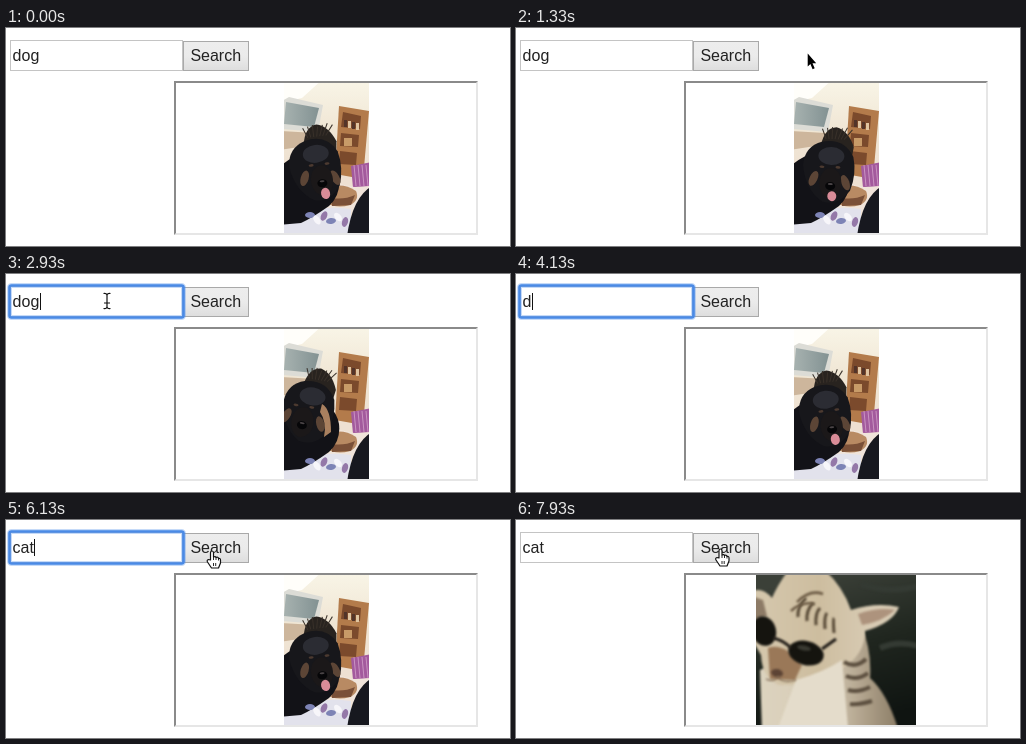
Write an HTML page with a canvas that moves like this. It is 504 px wide and 218 px high and loops after 8000 ms.

```html
<!DOCTYPE html>
<html lang="en">
<head>
<meta charset="utf-8">
<title>Image search</title>
<style>
  html, body { margin: 0; width: 100%; height: 100%; overflow: hidden; background: #fff; }
  canvas { display: block; }
</style>
</head>
<body>
<canvas width="504" height="218"></canvas>
<script>
const LOOP = 8000, FOCUS = 2860, CLICK = 6500, RELEASE = 6600, BLANK = 6730, CAT = 7000, CAT_CUT = 7600;
const DOG_PERIOD = 2045;
const ctx = document.querySelector('canvas').getContext('2d');

// Contents of the search field from each time on.
const typing = [[0, 'dog'], [3600, 'do'], [3930, 'd'], [4300, ''], [4600, 'c'], [4870, 'ca'], [5130, 'cat']];

// Pointer hot spot: time, x, y.
const pointer = [[900, 512, 10], [1250, 298, 25], [1330, 291, 25], [1800, 291, 25],
  [2600, 118, 27], [2800, 101, 27], [5500, 101, 27], [6000, 206, 32], [6300, 206, 32], [6500, 204.5, 30]];

// Dog head: phase, x, y, tilt, muzzle shift, tongue length.
const dogHead = [[0, 309, 136, -.12, 3, 9], [450, 306, 134, 0, -3, 6], [880, 303, 132, .16, -6, 0],
  [1330, 313, 138, .04, 0, 8], [1700, 311, 137, -.06, 2, 9], [DOG_PERIOD, 309, 136, -.12, 3, 9]];

function sample(keys, t) {
  const i = keys.findIndex(k => k[0] > t);
  if (i === 0) return keys[0].slice(1);
  if (i < 0) return keys.at(-1).slice(1);
  const a = keys[i - 1], b = keys[i];
  const u = (t - a[0]) / (b[0] - a[0]), e = u * u * (3 - 2 * u);
  return a.slice(1).map((v, n) => v + (b[n + 1] - v) * e);
}

function rect(color, x, y, w, h) {
  ctx.fillStyle = color;
  ctx.fillRect(x, y, w, h);
}
function shape(color, d) {
  ctx.fillStyle = color;
  ctx.fill(new Path2D(d));
}
function line(color, width, d) {
  ctx.strokeStyle = color;
  ctx.lineWidth = width;
  ctx.stroke(new Path2D(d));
}
function oval(color, x, y, rx, ry, angle = 0) {
  ctx.fillStyle = color;
  ctx.beginPath();
  ctx.ellipse(x, y, rx, ry, angle, 0, Math.PI * 2);
  ctx.fill();
}
function gradient(x0, y0, x1, y1, ...colors) {
  const g = ctx.createLinearGradient(x0, y0, x1, y1);
  colors.forEach((c, i) => g.addColorStop(i / (colors.length - 1), c));
  return g;
}
function photo(x, w, blur, draw) {
  ctx.save();
  ctx.beginPath();
  ctx.rect(x, 55, w, 150);
  ctx.clip();
  ctx.filter = `blur(${blur}px)`;
  draw();
  ctx.restore();
}

function drawRoom() {
  rect(gradient(0, 55, 0, 150, '#f8f4e6', '#f0e6d4', '#eee0d2'), 270, 50, 100, 160);
  shape('#fffefa', 'M274 50H318L296 70L274 75Z');
  // Television on its stand
  shape('#cdb69c', 'M274 103L326 106V114L274 122Z');
  shape('#dcdcd6', 'M276 73L283 69L317 77L312 104L276 101Z');
  shape(gradient(280, 0, 316, 0, '#a5b0ae', '#7f8f90'), 'M280 74L313 80L308 99L278 96Z');
  // Shelf
  shape('#b37b4b', 'M333 78L363 83L357 151L329 146Z');
  shape('#7b4a2c', 'M337 84L355 88L354 101L335 99ZM335 105L353 107L352 119L334 118ZM334 123L351 125L350 137L333 136Z');
  for (let i = 0; i < 4; i++) rect(i % 2 ? '#e0c4a0' : '#523429', 338 + i * 4, 92 + i, 3, 7);
  rect('#c89b68', 338, 110, 8, 8);
  // Basket
  shape('#a35a9d', 'M345 138L366 134V158L347 160Z');
  for (let i = 0; i < 4; i++) line('#d3a3cb', .8, `M${348 + i * 4} 137L${350 + i * 4} 158`);
  shape('#f0e4da', 'M318 152L348 159L366 158V185H318Z');
}

function drawDog(t) {
  const [x, y, tilt, muzzle, tongue] = sample(dogHead, t % DOG_PERIOD);
  drawRoom();
  shape('#e2e2ec', 'M274 192Q305 176 345 181V210H274Z');
  shape('#b88a63', 'M322 160Q336 154 350 163Q354 172 344 177Q331 181 320 175Z');
  shape('#7a5038', 'M326 170Q338 172 349 167L345 177L326 178Z');
  shape('#121217', 'M272 140Q288 126 302 124Q329 128 333 150Q335 167 323 178Q306 190 295 195L272 197Z');
  ctx.save();
  ctx.translate(x, y);
  ctx.rotate(tilt);
  shape('#28231f', 'M-9-20Q-6-38 6-39Q18-36 24-20L22-6L0-10Z');
  shape('#17171b', 'M-26 0Q-25-19-8-24Q14-29 24-10Q28 7 22 24Q11 40-5 36Q-23 25-26 0Z');
  oval('#2b2c33', 2, -10, 13, 9);
  for (let i = 0; i < 7; i++) line('#39312a', 1, `M${i * 3 - 4}-27L${i * 5 - 8}-${37 + i % 3}`);
  oval('#5c4536', -15 + muzzle, 13, 4, 8, .4);
  oval('#5c4536', 17 + muzzle / 2, 16, 4, 8, -.4);
  oval('#1b1819', 2 + muzzle, 17, 11, 15);
  oval('#4c3a30', -7 + muzzle, 1, 2.5, 1.3);
  oval('#4c3a30', 9 + muzzle, 1, 2.5, 1.3);
  oval('#060608', 2 + muzzle, 20, 5, 4);
  oval('#4a4446', 2 + muzzle, 18, 2.5, 1);
  if (tongue > 1) oval('#d98c98', 4 + muzzle, 26 + tongue / 2, 4.5, tongue / 1.6, -.1);
  ctx.restore();
  // Front leg seen while the head is turned away
  ctx.globalAlpha = Math.max(0, -muzzle / 6);
  shape('#a9805f', 'M316 130Q325 135 325 158L318 163Q321 148 314 138Z');
  ctx.globalAlpha = 1;
  for (let i = 0; i < 6; i++) {
    oval(['#7d83b5', '#f7f6fa', '#9478a8'][i % 3], 304 + i * 7, 187 + (i * 5) % 9, 5, 3, i);
  }
  shape('#17181f', 'M368 157Q347 167 341 208H368Z');
}

function drawCatBiting(t) {
  const sway = Math.sin((t - 7270) / 130) * 2;
  rect(gradient(240, 55, 400, 205, '#3b413a', '#262d28', '#161c18', '#20261f'), 235, 50, 170, 160);
  shape('#474c43', 'M235 62Q262 58 285 66Q262 76 235 94Z');
  line('#3a403a', 5, 'M366 128Q384 140 402 132M374 158Q388 170 402 164');
  ctx.save();
  ctx.translate(sway, 0);
  // Body, then head with both ears
  shape(gradient(285, 0, 378, 0, '#d9d2c3', '#cfc3b0', '#8f8470'),
    'M284 140L350 112Q356 142 366 162Q376 182 379 210H272Z');
  shape(gradient(290, 80, 365, 130, '#cfc2ac', '#b7a78f', '#c3b59f'),
    'M312 50H344Q359 58 366 72Q374 66 384 72L388 92L399 99Q392 113 364 118Q357 137 338 149Q312 160 292 148Q282 134 288 118L292 92Q297 70 312 50Z');
  shape('#d8c6b4', 'M364 101Q378 92 396 100Q383 111 366 114Z');
  shape('#a08f79', 'M366 73Q376 68 382 74L384 89Q373 86 366 73Z');
  shape('#ded5c4', 'M288 120Q303 113 316 125Q337 128 345 117Q349 138 328 149Q300 155 287 139Z');
  oval('#dcd1bd', 309, 99, 5, 14, .2);
  for (let i = 0; i < 5; i++) {
    line('#6d604d', 1.8, `M${316 + i * 6} ${91 - i * 5}Q${328 + i * 5} ${80 - i * 2} ${346 + i * 4} ${84 - i * 2}`);
  }
  line('#84745f', 1.8, 'M336 113Q350 112 359 103M337 122Q351 122 359 113');
  oval('#43372c', 300, 96, 2.5, 6, -.25);
  oval('#4d3f31', 326, 112, 7, 2.5, .2);
  oval('#927566', 296, 126, 5, 3.5, .4);
  line('#4a3a2d', 2.5, 'M274 150Q298 142 328 137');
  for (let i = 0; i < 4; i++) line('#b7b9ad', .8, `M286 ${121 + i * 3}Q265 ${110 + i * 5} ${249 + i * 3} ${98 + i * 10}`);
  ctx.restore();
  shape('#988467', 'M236 130L249 138L253 155L236 164Z');
  ctx.save();
  ctx.translate(0, sway);
  shape(gradient(0, 148, 0, 200, '#d9d9cf', '#c7c9c1'),
    'M242 160Q258 147 276 149Q295 149 306 164Q326 176 319 192Q304 198 290 191Q273 205 260 192Q244 194 247 181Q241 172 242 160Z');
  for (let i = 0; i < 5; i++) line('#e8e8e0', 2, `M${252 + i * 10} ${162 - i % 2 * 5}L${259 + i * 12} ${186 - i % 3 * 4}`);
  ctx.restore();
}

function drawCatShades(t) {
  rect(gradient(300, 55, 340, 205, '#3b4038', '#20261f', '#0f1411'), 235, 50, 170, 160);
  line('#343a33', 6, 'M345 64Q372 74 402 66M364 128Q382 120 402 126');
  ctx.save();
  ctx.translate((7930 - t) / 80, (t - 7930) / 110);
  // Body, then head with both ears
  shape(gradient(240, 0, 380, 0, '#ddd4c0', '#d6cab4', '#8f8069'),
    'M244 150L345 105Q356 130 354 158Q372 174 383 212H246Z');
  shape(gradient(250, 0, 355, 0, '#d4c6ab', '#cdbd9f', '#d8cbb4'),
    'M235 72Q246 66 256 78Q262 64 274 48H306Q326 64 335 90Q360 82 383 87Q377 103 349 111Q349 134 327 148Q300 166 263 165Q246 158 245 135L235 118Z');
  shape('#ad937d', 'M342 94Q362 87 379 90Q366 102 346 105Z');
  shape('#8d7b66', 'M235 76L247 80L251 96L235 100Z');
  shape('#e4dccb', 'M280 160Q308 152 326 140L332 208H262Z');
  for (let i = 0; i < 5; i++) {
    line('#574936', 3, `M${282 + i * 9} ${97 + i * 4}Q${281 + i * 9} ${87 + i * 3} ${290 + i * 7} ${78 + i * 5}`);
  }
  line('#6b5a44', 2.5, 'M281 82Q294 69 307 74M275 91Q286 81 299 84');
  for (let i = 0; i < 4; i++) line('#5d5040', 4, `M${328 + i * 2} ${142 + i * 14}Q${340 + i} ${149 + i * 12} ${350 + i * 2} ${139 + i * 14}`);
  shape('#9a7858', 'M252 128Q268 122 286 145L279 160L254 159Z');
  oval('#15140f', 248, 111, 12, 15, -.25);
  oval('#15140f', 290, 133, 18, 12, .25);
  line('#211d18', 3, 'M257 118Q267 120 275 128M306 129L320 119');
  oval('#3a3a32', 288, 128, 7, 2.5, .2);
  oval('#5d4435', 261, 153, 6, 4, .2);
  line('#7d6751', 1.2, 'M262 156Q266 164 280 160M262 156Q258 163 250 159');
  ctx.restore();
}

function drawPage(t) {
  const text = typing.findLast(k => k[0] <= t);
  const focused = t >= FOCUS && t < CLICK;
  rect('#fff', 0, 0, 504, 218);

  // Button
  const pressed = t >= CLICK && t < RELEASE;
  rect('#a9a9a9', 177, 13, 66, 30);
  const face = pressed ? ['#cfcfcf', '#e4e4e4'] : ['#ededed', '#ebebeb', '#dedede'];
  rect(gradient(0, 14, 0, 42, ...face), 178, 14, 64, 28);

  // Search field
  rect('#c4c4c4', 4, 12, 173, 31);
  rect('#fff', 5, 13, 171, 29);
  if (focused) {
    ctx.strokeStyle = 'rgba(90,150,235,.35)';
    ctx.lineWidth = 5;
    ctx.beginPath();
    ctx.roundRect(3.5, 11.5, 174, 32, 2);
    ctx.stroke();
    ctx.strokeStyle = '#4a8ae6';
    ctx.lineWidth = 2.6;
    ctx.stroke();
  }

  ctx.font = '16px "Liberation Sans", Arial, sans-serif';
  ctx.fillStyle = '#222';
  ctx.fillText('Search', 184.4, 33);
  ctx.fillText(text[1], 6.6, 33);
  const idle = t - Math.max(text[0], FOCUS);
  if (focused && idle % 1000 < 500) rect('#111', Math.round(7 + ctx.measureText(text[1]).width), 19, 1, 17);

  // Inset frame
  shape('#e6e6e6', 'M472 53V207H168L170 205H470V55Z');
  shape('#8a8a8a', 'M168 207V53H472L470 55H170V205Z');
}

function drawPointer(t) {
  if (t < 900 || (t > 3550 && t < 5500)) return;
  const [x, y] = sample(pointer, t);
  ctx.save();
  ctx.translate(x, y);
  ctx.lineJoin = 'round';
  if (x < 177) {
    const beam = 'M-3.5-7.5Q0-8 0-5.5Q0-8 3.5-7.5M0-6V6M-3 2H3M-3.5 7.5Q0 8 0 5.5Q0 8 3.5 7.5';
    line('#fff', 2.5, beam);
    line('#111', 1.2, beam);
  } else if (x < 243) {
    ctx.translate(-5.5, -1);
    const hand = 'M4 9V2Q4 0 5.5 0T7 2V6Q9 5 9.5 6.5Q11.5 5.5 12 7.5Q14 7 14 9V12L12 17H5L1 11Q0 9 2 8.5Z';
    shape('#fff', hand);
    line('#111', 1.2, hand);
    line('#111', .9, 'M7 6V9M9.5 6.5V9M12 7.5V9.5M7 12V15M9.2 12V15');
  } else {
    const arrow = 'M.7 .5V13.5L3.4 11L5.6 16.2L7.7 15.3L5.5 10.2H9.2Z';
    line('#fff', 2, arrow);
    shape('#000', arrow);
  }
  ctx.restore();
}

function frame(now) {
  const t = now % LOOP;
  drawPage(t);
  if (t < BLANK) photo(278, 85, .7, () => drawDog(t));
  else if (t >= CAT) photo(240, 160, 1.2, () => (t < CAT_CUT ? drawCatBiting : drawCatShades)(t));
  drawPointer(t);
  requestAnimationFrame(frame);
}
requestAnimationFrame(frame);
</script>
</body>
</html>
```
